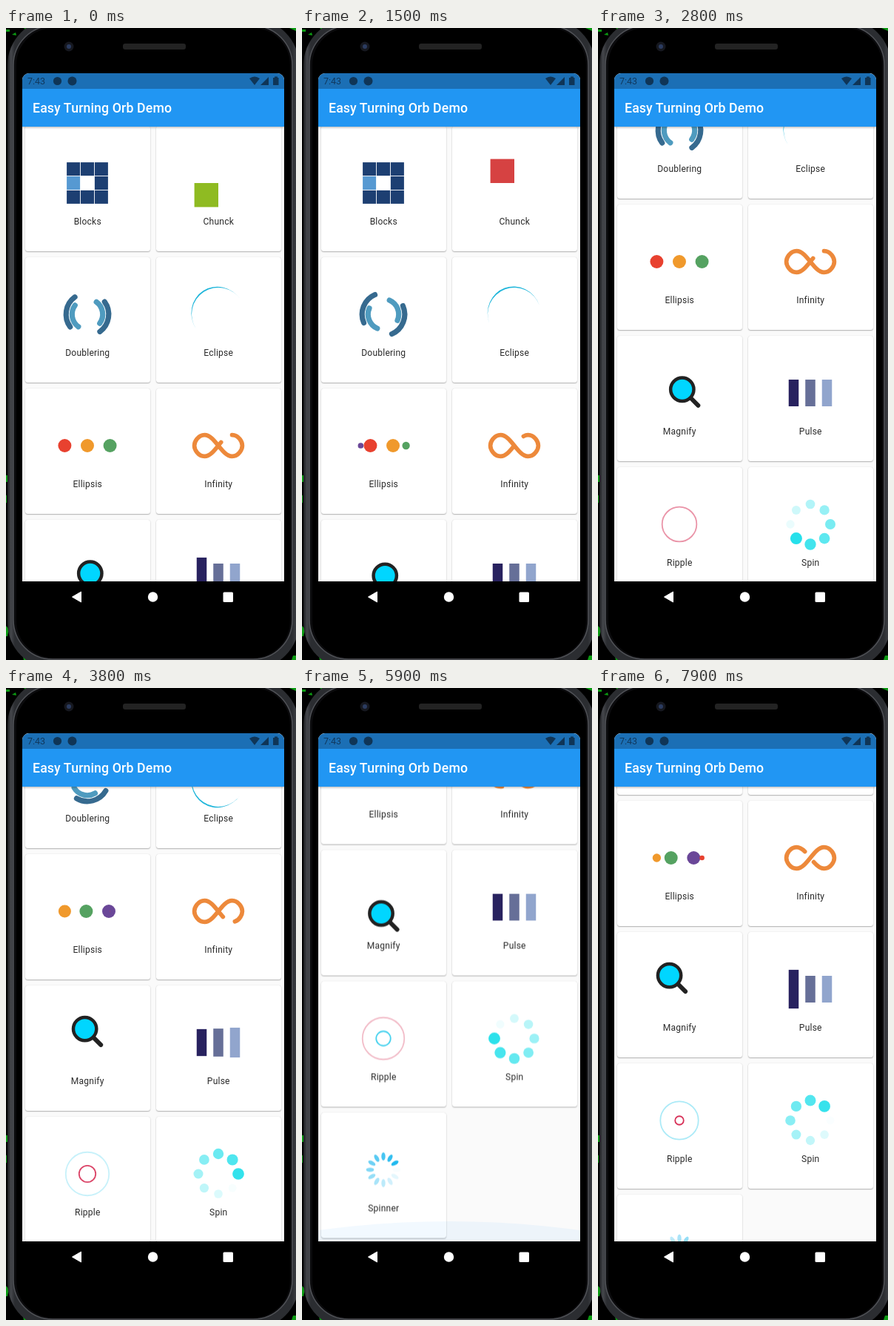
Animation of 392 by 852 pixels, one loop 8 s. Source, as an HTML page:

```html
<!DOCTYPE html>
<html lang="en">
<head>
<meta charset="utf-8">
<title>Loaders</title>
<style>
  html, body { margin: 0; width: 100%; height: 100%; overflow: hidden; background: #000; }
  body { position: relative; font-family: Roboto, sans-serif; }
  .phone { position: absolute; left: 0; top: 0; }
  .screen { position: absolute; left: 22px; top: 61px; width: 354px; height: 685px;
    overflow: hidden; border-radius: 9px 9px 0 0; background: #fafafa; }
  .status { position: absolute; width: 100%; height: 21px; background: #1b6fb5; }
  .bar { position: absolute; top: 21px; width: 100%; height: 50.5px; background: #2196f3;
    box-shadow: 0 1px 3px rgba(0, 0, 0, .32); }
  .title { position: absolute; left: 14px; top: 0; line-height: 52px; white-space: nowrap;
    font-size: 17.7px; font-weight: 500; letter-spacing: .13px; color: #fff; }
  .time { position: absolute; left: 7px; top: 0; line-height: 21px; font-size: 12.5px; color: #11395f; }
  .status svg { position: absolute; left: 0; top: 0; }
  .list { position: absolute; top: 71px; left: 0; width: 100%; will-change: transform; }
  .card { position: absolute; width: 169.5px; height: 169px; background: #fff; border-radius: 3.5px;
    box-shadow: 0 1px 1.5px rgba(0, 0, 0, .28), 0 0 1.5px rgba(0, 0, 0, .14); }
  .card svg { position: absolute; left: 39.75px; top: 32px; overflow: visible; }
  .card span { position: absolute; left: 0; width: 100%; top: 119px; line-height: 20px; text-align: center;
    font-size: 12.06px; letter-spacing: .215px; color: #2a2a2a; }
  .glow { position: absolute; left: -1123px; top: 658px; width: 2600px; height: 2600px;
    border-radius: 50%; background: #2196f3; opacity: 0; }
</style>
</head>
<body>
<svg class="phone" width="392" height="852" viewBox="0 0 392 852">
  <defs>
    <linearGradient id="rim">
      <stop offset="0" stop-color="#1d1e21"/>
      <stop offset=".012" stop-color="#45474c"/>
      <stop offset=".025" stop-color="#2b2d31"/>
      <stop offset=".975" stop-color="#2b2d31"/>
      <stop offset="1" stop-color="#45474c"/>
    </linearGradient>
  </defs>
  <g fill="#0c9a12">
    <path d="M0 2h5v3H0zM24 0h9l-5 4zM8 9l5-3 1 4zM0 603h2v9H0zM0 630h1v10H0z"/>
    <path d="M0 806l4 4-2 10H0zM22 843l12 6v3H24zM383 0h9v4zM388 846h4v6h-6z"/>
  </g>
  <rect x="2" y="-12" width="394" height="876" rx="62" fill="url(#rim)"/>
  <rect x="10" y="-3" width="377" height="854" rx="53" fill="#0b0b0d" stroke="#505257" stroke-width="1.500"/>
  <rect x="14" y="0" width="370" height="849" rx="50" fill="#000"/>
  <rect x="158" y="21" width="85" height="8" rx="3" fill="#232323"/>
  <circle cx="85" cy="25" r="6.500" fill="#16181f"/>
  <circle cx="85" cy="25" r="3" fill="#2b3c60"/>
  <g fill="#fff">
    <path d="M89.500 767l12-7v14z" stroke="#fff" stroke-linejoin="round"/>
    <circle cx="198.500" cy="767" r="6.700"/>
    <rect x="293.500" y="760.500" width="13.500" height="13.500" rx="1.500"/>
  </g>
</svg>

<div class="screen">
  <div class="list" id="list"></div>
  <div class="glow" id="glow"></div>
  <div class="bar"><div class="title">Easy Turning Orb Demo</div></div>
  <div class="status">
    <div class="time">7:43</div>
    <svg width="354" height="21" fill="#0f3557">
      <circle cx="47.500" cy="10.500" r="5.600"/>
      <circle cx="67.500" cy="10.500" r="6"/>
      <path d="M307 7q7-5 14 0l-7 9zM333 5v11h-11zM339 6h2v-1.500h4V6h1.500v10H339z"/>
    </svg>
  </div>
</div>

<script>
const LOOP = 8000, STEP = 100, TAU = Math.PI * 2;

// Turns made by the loaders, list offset and edge glow over time (ms).
const TURNS = [[0, 0], [1500, 1.035], [2800, 2], [4700, 3.3], [7300, 5.146], [7900, 5.571], [8000, 5.642]];
const SCROLL = [[1800, 0], [2000, 22], [2200, 85], [2400, 165], [2600, 222], [2800, 248], [3200, 262],
  [3800, 262], [4200, 290], [4700, 375.5], [5100, 425], [5500, 444.5], [6500, 444.5], [6900, 439],
  [7300, 420], [7600, 377], [7900, 334], [8000, 322]];
const GLOW = [[5400, 0], [5800, .06], [6000, .06], [6400, 0]];

const frac = x => x - Math.floor(x);
const mix = (a, b, k) => a + (b - a) * k;

function track(points, t) {
  if (t <= points[0][0]) return points[0][1];
  for (let i = 1; i < points.length; i++) {
    const [t0, a] = points[i - 1], [t1, b] = points[i];
    if (t <= t1) return mix(a, b, (t - t0) / (t1 - t0));
  }
  return points[points.length - 1][1];
}

function bezier(x1, y1, x2, y2) {
  const curve = (a, b, s) => 3 * a * s * (1 - s) ** 2 + 3 * b * s * s * (1 - s) + s ** 3;
  return x => {
    let lo = 0, hi = 1;
    for (let i = 0; i < 24; i++) {
      const mid = (lo + hi) / 2;
      if (curve(x1, x2, mid) < x) lo = mid; else hi = mid;
    }
    return curve(y1, y2, lo);
  };
}
const snap = bezier(0, .5, .5, 1);
const spread = bezier(0, .2, .8, 1);
const fade = bezier(.2, 0, .8, 1);

function set(node, attrs) {
  for (const key in attrs) node.setAttribute(key, attrs[key]);
  return node;
}
function add(parent, tag, attrs) {
  return parent.appendChild(set(document.createElementNS('http://www.w3.org/2000/svg', tag), attrs));
}
const polar = (r, turn) => [r * Math.cos(turn * TAU), r * Math.sin(turn * TAU)];

// Each loader draws into a 100-unit box centred on 0,0 and returns its update(turns, ms).
function blocks(svg) {
  const ring = [[0, 0], [1, 0], [2, 0], [2, 1], [2, 2], [1, 2], [0, 2], [0, 1]];
  const cells = ring.map(([x, y]) =>
    add(svg, 'rect', { x: -31 + x * 21, y: -31 + y * 21, width: 20, height: 20 }));
  return c => {
    const lit = Math.floor(frac(c - .05) * 8);
    cells.forEach((cell, i) => set(cell, { fill: i === lit ? '#5699d2' : '#1d3f72' }));
  };
}

function chunk(svg) {
  const spots = [[-36, -36, '#d64242'], [0, -36, '#e88c2e'], [0, 0, '#f2c230'], [-36, 0, '#8fbb22']];
  const box = add(svg, 'rect', { width: 36, height: 36 });
  return c => {
    const [x, y, fill] = spots[Math.floor(frac(c - .02) * 4)];
    set(box, { x, y, fill });
  };
}

function doubleRing(svg) {
  const ring = (r, stroke) => add(svg, 'circle', {
    r, stroke, fill: 'none', 'stroke-width': 8, 'stroke-linecap': 'round',
    pathLength: 4, 'stroke-dasharray': '1 1'
  });
  const outer = ring(32, '#366a8f'), inner = ring(23, '#4f9bbf');
  return c => {
    const angle = 9 + 360 * c;
    set(outer, { transform: `rotate(${angle - 45})` });
    set(inner, { transform: `rotate(${-angle - 45})` });
  };
}

function eclipse(svg) {
  const arc = add(svg, 'path', { d: 'M-40 0A40 40 0 0 0 40 0A40 42 0 0 1 -40 0', fill: '#1db5da' });
  return c => set(arc, { transform: `rotate(${147 + 360 * c})` });
}

function ellipsis(svg) {
  const dots = ['#6a4798', '#e8412f', '#f0992c', '#55a261'].map(fill => add(svg, 'circle', { fill }));
  return c => dots.forEach((dot, i) => {
    const p = frac(c - .006 + i / 4) * 4, stage = Math.floor(p), k = snap(p - stage);
    const cx = [-34, -34 + 34 * k, 34 * k, 34][stage];
    const r = [10 * k, 10, 10, 10 * (1 - k)][stage];
    set(dot, { cx, r });
  });
}

function infinity(svg) {
  const gap = .1;
  const line = add(svg, 'path', {
    d: 'M24.300 30C11.400 30 5 43.300 5 50s6.400 20 19.300 20c19.300 0 32.100-40 51.400-40' +
      'C88.600 30 95 43.300 95 50s-6.400 20-19.300 20C56.400 70 43.600 30 24.300 30z',
    transform: 'scale(.8) translate(-50 -50)', fill: 'none', stroke: '#ed893b', 'stroke-width': 8,
    'stroke-linecap': 'round', pathLength: 1, 'stroke-dasharray': `${1 - gap} ${gap}`
  });
  return c => set(line, { 'stroke-dashoffset': -frac(.45 - c + gap / 2) });
}

function magnify(svg) {
  const corners = [[12, -20.5], [-4.5, 11.8], [-21, -20.5], [12, -20.5]];
  const glass = add(svg, 'g', { stroke: '#222', 'stroke-linecap': 'round' });
  add(glass, 'path', { d: 'M12 12L24 24', 'stroke-width': 6.5 });
  add(glass, 'circle', { r: 17.4, fill: '#00d6ff', 'stroke-width': 5 });
  return c => {
    const p = frac(c + .157) * 3, i = Math.floor(p);
    const [x, y] = corners[i].map((v, n) => mix(v, corners[i + 1][n], p - i));
    set(glass, { transform: `translate(${x} ${y})` });
  };
}

function pulse(svg) {
  const bars = ['#28225f', '#666f98', '#91a5cd'].map((fill, i) =>
    add(svg, 'rect', { x: -32.5 + 25 * i, width: 15, fill }));
  return (c, t) => bars.forEach((bar, i) => {
    const p = frac(t / 1580 + .02 - i / 10);
    const height = mix(64, 40, p < .5 ? snap(p * 2) : 1);
    set(bar, { y: -height / 2, height });
  });
}

function ripple(svg) {
  const rings = ['#35cdec', '#d62a52'].map(stroke =>
    add(svg, 'circle', { stroke, fill: 'none', 'stroke-width': 2 }));
  return c => rings.forEach((ring, i) => {
    const p = frac(c + i / 2);
    set(ring, { r: 40 * spread(p), opacity: 1 - fade(p) });
  });
}

function spin(svg) {
  const dots = Array.from({ length: 8 }, (_, i) => {
    const [cx, cy] = polar(30, i / 8);
    return add(svg, 'circle', { cx, cy, fill: '#1fdfea' });
  });
  return c => dots.forEach((dot, i) => {
    const lag = frac(c + .405 - i / 8);
    set(dot, { r: 9 - 3 * lag, opacity: 1 - lag });
  });
}

function spinner(svg) {
  const petals = Array.from({ length: 12 }, (_, i) =>
    add(svg, 'ellipse', { cx: 20, rx: 6, ry: 3, fill: '#13b5ee', transform: `rotate(${i * 30})` }));
  return c => petals.forEach((petal, i) => set(petal, { opacity: 1 - frac(c - .183 - i / 12) }));
}

const list = document.getElementById('list'), glow = document.getElementById('glow');
const updates = [
  ['Blocks', blocks], ['Chunck', chunk], ['Doublering', doubleRing], ['Eclipse', eclipse],
  ['Ellipsis', ellipsis], ['Infinity', infinity], ['Magnify', magnify], ['Pulse', pulse],
  ['Ripple', ripple], ['Spin', spin], ['Spinner', spinner]
].map(([name, make], i) => {
  const card = list.appendChild(document.createElement('div'));
  card.className = 'card';
  card.style.left = 3.5 + 177 * (i % 2) + 'px';
  card.style.top = 177 * Math.floor(i / 2) + 'px';
  const svg = add(card, 'svg', { width: 90, height: 90, viewBox: '-50 -50 100 100' });
  card.appendChild(document.createElement('span')).textContent = name;
  return make(svg);
});

function draw(ms) {
  const t = Math.floor((ms % LOOP) / STEP) * STEP;
  const turns = track(TURNS, t);
  updates.forEach(update => update(turns, t));
  list.style.transform = `translateY(${-track(SCROLL, t)}px)`;
  glow.style.opacity = track(GLOW, t);
}

const start = performance.now();
function tick() {
  draw(performance.now() - start);
  requestAnimationFrame(tick);
}
tick();
</script>
</body>
</html>
```
